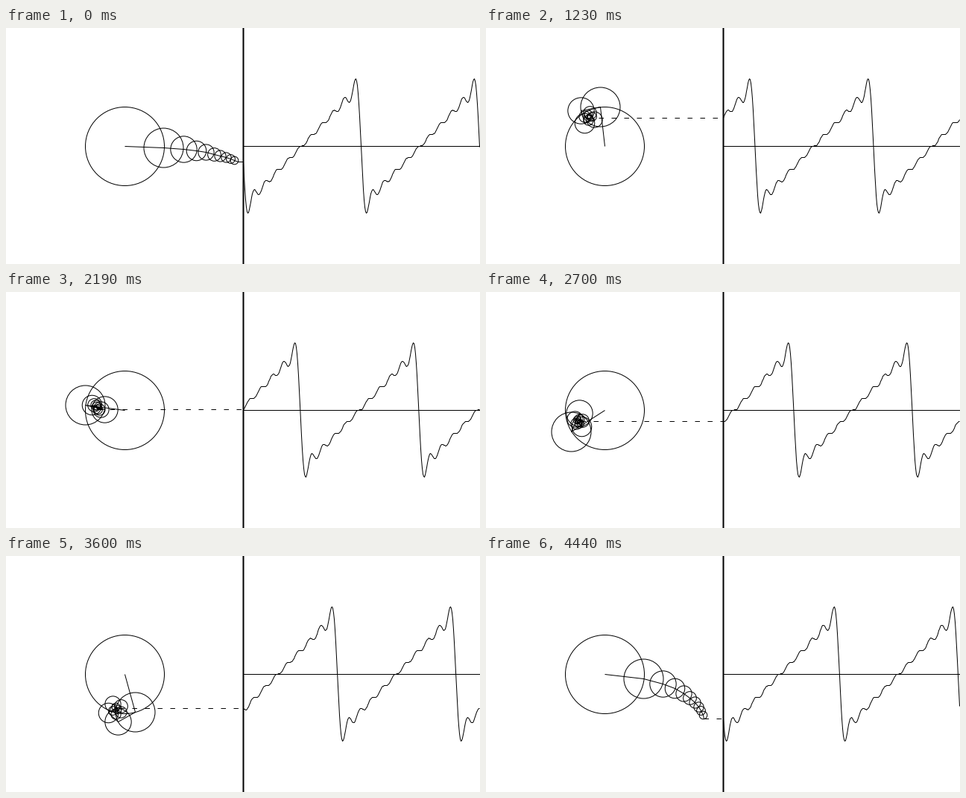
A matplotlib script for the animation above (4470 ms loop, 636 px wide and 318 px high).

```python
import numpy as np
import matplotlib.pyplot as plt
from matplotlib.animation import FuncAnimation
from matplotlib.patches import Circle

W, H, DPI = 636, 318, 100
PX = 72 / DPI                 # one pixel in points
FRAMES, INTERVAL = 149, 30
STEP = 2 * np.pi / 150        # turn of the first circle per frame
CENTER = 159
RADIUS, PERIOD = 53, 159
PLOT_X = 318.5

n = np.arange(1, 11)
radii = RADIUS / n

fig = plt.figure(figsize=(W / DPI, H / DPI), dpi=DPI, facecolor="white")
ax = fig.add_axes([0, 0, 1, 1])
ax.set_xlim(0, W)
ax.set_ylim(H, 0)
ax.axis("off")


def to_pixel(v):
    """Middle of the whole pixel that holds v."""
    return np.floor(v + 1e-9) + 0.5


def stroke(xs, ys, width=1, **style):
    return ax.plot(xs, ys, color="black", lw=width * PX, snap=False,
                   solid_capstyle="butt", **style)[0]


mid = to_pixel(CENTER)
stroke([PLOT_X, W], [mid, mid])
stroke([PLOT_X, PLOT_X], [0, H], width=2)

circles = [ax.add_patch(Circle((mid, mid), r, fill=False, ec="black", lw=PX))
           for r in radii]
arm = stroke([], [], solid_joinstyle="round")
pointer = stroke([], [], linestyle=(0, (6.5, 10.5)), dash_capstyle="butt")

wave_x = np.arange(PLOT_X, W)
wave = stroke(wave_x, np.full_like(wave_x, mid), solid_joinstyle="round")


def height(angle):
    """Partial sawtooth sum as a y coordinate."""
    return to_pixel(CENTER - np.sin(np.outer(angle, n)) @ radii)


def update(frame):
    angle = (frame - 1) * STEP
    links = radii * np.exp(-1j * n * angle)
    joints = CENTER * (1 + 1j) + np.concatenate(([0], np.cumsum(links)))
    xs, ys = to_pixel(joints.real), to_pixel(joints.imag)
    for circle, x, y in zip(circles, xs, ys):
        circle.center = (x, y)
    arm.set_data(xs, ys)
    pointer.set_data([xs[-1], PLOT_X], [ys[-1], ys[-1]])
    wave.set_ydata(height(angle - 2 * np.pi * (wave_x - PLOT_X) / PERIOD))
    return [*circles, arm, pointer, wave]


anim = FuncAnimation(fig, update, frames=FRAMES, interval=INTERVAL,
                     init_func=lambda: update(0), repeat=True, repeat_delay=0)
plt.show()
```
